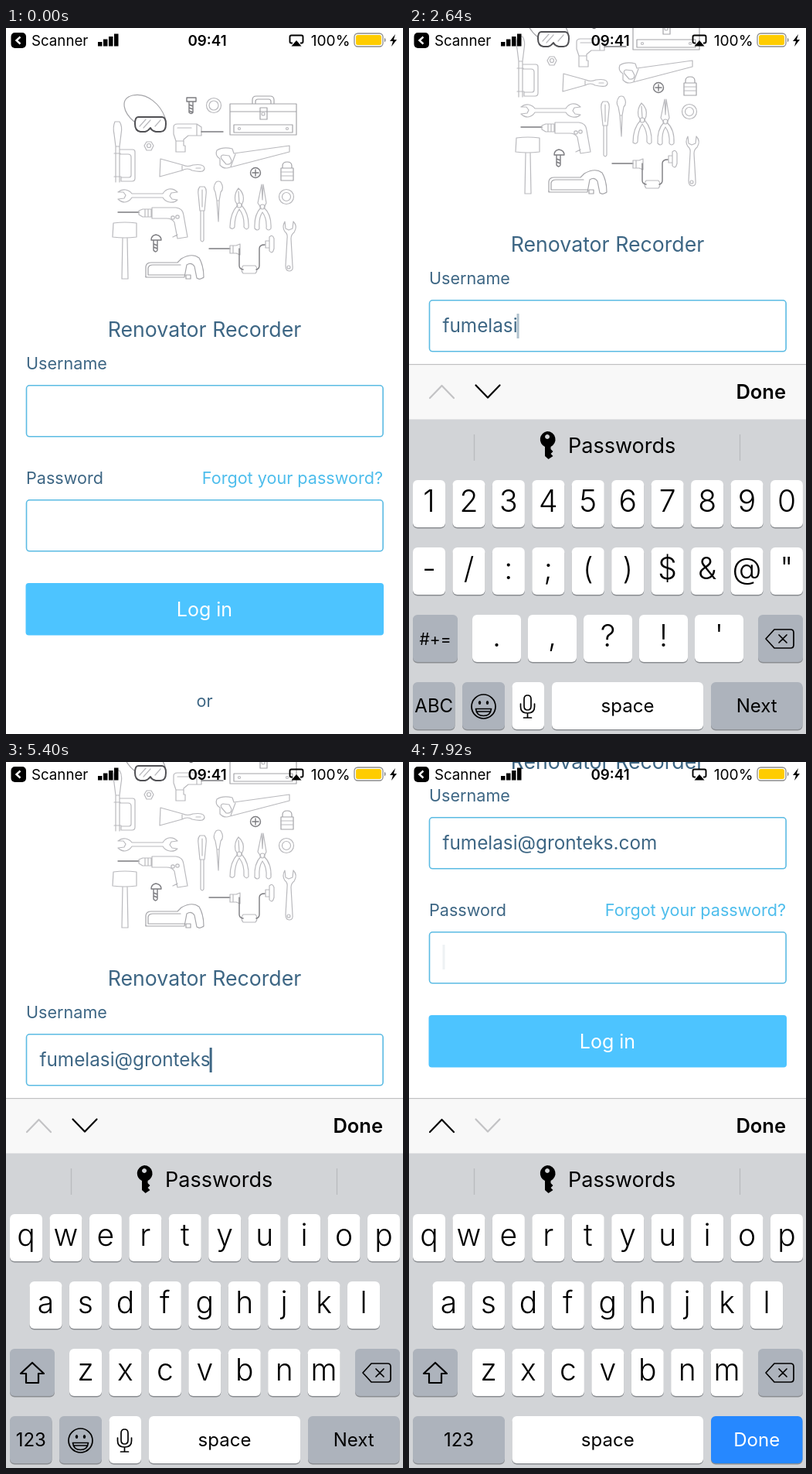
Write an HTML page that moves like this. It is 514x912 px and loops after 8 s.

```html
<!DOCTYPE html>
<html lang="en">
<head>
<meta charset="utf-8">
<title>Login</title>
<style>
html, body { margin: 0; width: 100%; height: 100%; overflow: hidden; background: #fff; }
svg { display: block; width: 514px; height: 912px; font-family: Inter, "Open Sans", sans-serif; }
.mid { text-anchor: middle; }
.end { text-anchor: end; }
.ink { fill: #3d6684; }
.link { fill: #4dbdec; }
.field { fill: #fff; stroke: #5bbbe3; stroke-width: 1.6; }
.art { fill: none; stroke: #b9b9bd; stroke-width: 1.2; stroke-linejoin: round; stroke-linecap: round; }
.art .mild { stroke: #a4a4a8; }
.art .dark { stroke: #7c7c80; stroke-width: 1.4; }
.art .bold { stroke: #505054; stroke-width: 2; }
.line { fill: none; stroke: #000; stroke-width: 2.2; stroke-linejoin: round; stroke-linecap: round; }
.thin { stroke-width: 1.7; }
.hidden { display: none; }
#popup { filter: drop-shadow(0 1px 3px rgba(0, 0, 0, .2)); }
</style>
</head>
<body>
<svg viewBox="0 0 514 912">
  <rect width="514" height="912" fill="#fff"/>
  <g id="page">
    <g class="art">
      <!-- goggles, screw, washers, toolbox -->
      <path class="mild" d="M167 122C151 109 147 91 164 87C183 83 200 99 206 116"/>
      <path class="bold" d="M171 115h31q5 0 5 9q0 10-7 10h-6q-5-1-7-5q-3 4-7 5h-6q-7-1-7-10q0-9 4-9z"/>
      <path d="M173 127l8-9M178 129l9-10M193 127l7-8"/>
      <path class="dark" d="M234 90h12v5h-12zM237 96v13q3 3 5 0v-13M237 99l5 2M237 103l5 2M237 107l5 2"/>
      <circle cx="269" cy="100" r="9.5"/><circle cx="269" cy="100" r="6"/>
      <circle cx="363" cy="218" r="9.5"/><circle cx="363" cy="218" r="5.5"/>
      <path class="mild" d="M290 98h86v40h-86zM290 108h86M319 98v-5q0-5 5-5h18q5 0 5 5v5M323 98v-3q0-3 3-3h14q3 0 3 3v3M329 103h9v15h-9zM295 125h76v10h-76z"/>
      <circle cx="333" cy="111" r="2"/><circle cx="302" cy="130" r="1.5"/><circle cx="364" cy="130" r="1.5"/>
      <!-- small drill -->
      <path d="M217 128q0-4 5-4h25l6 4v11h-17l-6 5v8h2v8h-12v-14l-3-9zM247 124v15M222 129h18M220 146h10"/>
      <path class="dark" d="M253 134h28"/>
      <!-- clamp and nut -->
      <path d="M141 121h6q4 6 2 16l-2 16h-5l-2-16q-2-9 1-16zM142 153v46M147 153v46M140 162h8M140 192h9M147 157h17q3 0 3 3v34q0 4-4 4h-14v-5h10q3 0 3-3v-23q0-4-4-4h-11z"/>
      <path d="M182 147h6l3 5l-3 6h-6l-3-6z"/><circle cx="185" cy="152" r="2.5"/>
      <!-- scraper, saw, screw head, padlock -->
      <path d="M200 169l-1 23l29-8q7-4 13 0q16 4 16-3q-1-6-15-4q-7 3-13 0zM228 178v6M246 181h6"/>
      <path d="M295 162l72-10v8l-77 20q-8 3-13-3v-8q-7-4-4-11q8-5 20-2zM281 164q-4 1-2 5l6 7q7 1 7-5l-3-6zM297 163l-6 16"/>
      <circle class="dark" cx="323" cy="187" r="6.5"/><path class="dark" d="M323 183v8M319 187h8"/>
      <path class="mild" d="M356 181h16v16h-16zM358 181v-3q0-5 6-5t6 5v3"/>
      <path d="M356 186h16M356 191h16"/>
      <!-- wrenches -->
      <path d="M145 212q5-4 10-3q5 1 8 5h40q3-5 8-6q6-1 11 4l-8 1l-2 4l3 4l7 1q-4 4-10 3q-6-1-9-6h-40q-3 5-9 6q-5 0-9-4l8-1l2-4l-3-4z"/>
      <path d="M361 250q-4 7 0 13q4 3 3 9l-2 35q0 7 5 7t4-7l-2-35q0-5 4-8q5-8-1-14l-1 9l-5 2l-4-2z"/><circle cx="366" cy="309" r="2"/>
      <!-- drivers and pliers -->
      <path d="M251 205h6q3 3 2 10l-2 21h-6l-2-21q-1-7 2-10zM252 236v38q2 4 4 0v-38M254 209v22"/>
      <path d="M272 199q3-2 6 0q5 8 0 13l-2 11h-3l-2-11q-4-6 1-13zM273 223l2 27l1-27"/>
      <path d="M301 207q-6 7-4 17l3 5q-10 10-10 29q4 3 6-1q0-14 6-23q7 9 6 23q3 5 6 1q1-18-9-29l2-5q2-10-6-17zM301 211l1 15"/><circle cx="302" cy="229" r="3"/>
      <path d="M331 202l-5 24l4 6q-9 9-8 27q4 4 6 0q-1-14 4-21q6 8 5 21q3 4 6 0q1-18-9-27l3-6l-4-24l-1 20z"/><circle cx="332" cy="231" r="3"/>
      <!-- large drill -->
      <path class="dark" d="M145 238h27"/>
      <path d="M172 236l5-2h11v10h-11l-5-3zM180 234v10M184 234v10M189 232h31q9 1 10 10l5 28l-13 2l-4-21q-3-5-10-5h-19zM216 270l6-3"/>
      <circle cx="216" cy="245" r="2.2"/><circle cx="222" cy="244" r="2.2"/>
      <!-- mallet, bolt, hacksaw, brace -->
      <path d="M139 252q15-2 30 0v18q-15 2-31 0zM151 271l-1 53h8l-1-53"/>
      <path class="dark" d="M188 274q0-6 6-7q7 1 7 7zM191 275v12q3 4 5 0v-12M191 279l5 2M191 283l5 2"/>
      <path class="mild" d="M181 322v-14q1-5 7-5h34l5-5q14-8 23-1q6 10 6 25q-5 4-9 1l-3-15q-4-6-10-2l-3 16h-48q-3 0-2-2zM184 319v-9q1-4 6-4h36M184 319h47M233 319h6v5h-6z"/>
      <path class="dark" d="M263 285h27"/>
      <path d="M290 281h8l5-2v14l-5-2h-8zM294 281v10M341 270q4-4 6 2v13q-2 8-6 3v-18zM336 275h5v9h-5zM307 307h16q4 5 0 10h-16q-4-5 0-10z"/>
      <path class="dark" d="M302 285v22q0 4 5 5M324 312q4-1 4-5v-22q0-5 7-5"/>
    </g>
    <text class="mid ink" x="257" y="399" font-size="26.7">Renovator Recorder</text>
    <g font-size="21.6">
      <text class="ink" x="26" y="441">Username</text>
      <text class="ink" x="26" y="589">Password</text>
      <text class="link end" x="488" y="589">Forgot your password?</text>
      <text class="ink mid" x="257" y="877">or</text>
    </g>
    <rect class="field" x="26.5" y="461.8" width="461.6" height="66" rx="4"/>
    <rect class="field" x="26.5" y="609.8" width="461.6" height="66" rx="4"/>
    <rect x="25.5" y="717" width="463.5" height="67.5" rx="4" fill="#4dc4ff"/>
    <text class="mid" x="257" y="759.5" font-size="25" fill="#fff">Log in</text>
    <text id="typed" class="ink" x="43.5" y="502.5" font-size="24.3"></text>
    <rect id="caret" class="ink" width="3" height="32"/>
  </g>

  <g id="keyboard">
    <rect y="434" width="514" height="72" fill="#f8f8f8"/>
    <rect y="434" width="514" height="1.2" fill="#c0c0c2"/>
    <rect y="505.5" width="514" height="408" fill="#d2d4d7"/>
    <path id="up" class="line" d="M27 478l15.5-16l15.5 16"/>
    <path id="down" class="line" d="M86.5 461.5l15.5 16l15.5-16"/>
    <text class="end" x="488" y="479" font-size="25.5" font-weight="600">Done</text>
    <path d="M84.5 525v34M428.5 525v34" stroke="#b9bbbe" stroke-width="1.3"/>
    <path fill-rule="evenodd" d="M179 521a10.5 10.5 0 0 1 4.5 20v3l3 3l-3 3l3 3l-6 4l-4.500-4v-12a10.5 10.5 0 0 1 3-20zM179 525a3 3 0 1 0 .1 0z"/>
    <text x="206" y="549" font-size="27">Passwords</text>
    <g id="keys"></g>
    <g id="popup">
      <path fill="#fff"/>
      <text class="mid" font-size="59" font-weight="300"></text>
    </g>
  </g>

  <g id="status">
    <rect x="6.5" y="6" width="19.5" height="20" rx="5"/>
    <path d="M18.5 11.5l-5 4.5l5 4.5" fill="none" stroke="#fff" stroke-width="2.4"/>
    <text x="33" y="22.5" font-size="18.7">Scanner</text>
    <path d="M119 18h5.5v5.5h-5.5zM126 14.5h5.5v9h-5.5zM133 11h5.5v12.5h-5.5zM140 7.5h5.5v16h-5.5z"/>
    <text class="mid" x="260.5" y="22.5" font-size="18.8" font-weight="600">09:41</text>
    <path d="M371 19.5h-1.5q-2 0-2-2v-6q0-2 2-2h13q2 0 2 2v6q0 2-2 2h-1.5" fill="none" stroke="#000" stroke-width="1.9"/>
    <path d="M376 16l6.5 7.5h-13z"/>
    <text class="end" x="445.5" y="22.5" font-size="19.2">100%</text>
    <rect x="451" y="7" width="37" height="17" rx="4.5" fill="#fff" stroke="#8c8c8c" stroke-width="1.3"/>
    <rect x="453" y="9" width="33" height="13" rx="2.5" fill="#ffcc00"/>
    <path d="M490 12.5q3 3 0 6z" fill="#777"/>
    <path d="M504 8l-7 9h4l-2 7l7-9h-4z"/>
  </g>
</svg>

<script>
const LOOP = 8000;
const ADDRESS = "fumelasi@gronteks.com";
// moment at which each character lands in the field
const TYPED_AT = [840, 1010, 1150, 1290, 1430, 1580, 1840, 2080, 3000,
  3740, 3920, 4090, 4270, 4440, 4640, 4870, 5100, 5820, 6360, 6560, 6780];
const SYMBOLS_SHOWN = [[2450, 3250], [5420, 5990]];
const PRESS = 120;
const OPEN = 160, NEXT = 7290, SLIDE = 426;
const KEY_STEP = 51.44, ROWS = [584, 671, 758, 845], KEY_H = 61;

const $ = id => document.getElementById(id);
const show = (node, on) => node.classList.toggle("hidden", !on);
const spots = {};

function add(parent, tag, attrs = {}, text = "") {
  const node = document.createElementNS("http://www.w3.org/2000/svg", tag);
  for (const name in attrs) node.setAttribute(name, attrs[name]);
  node.textContent = text;
  return parent.appendChild(node);
}

// draws one key and returns its label
function key(parent, x, row, w, label = "", { fill = "#fff", color = "#000", size = 24, weight = 400, dy = 38.5 } = {}) {
  const y = ROWS[row];
  add(parent, "rect", { x, y: y + 1.5, width: w, height: KEY_H, rx: 6, fill: "#8b8e92" });
  add(parent, "rect", { x, y, width: w, height: KEY_H, rx: 6, fill });
  return add(parent, "text", { class: "mid", x: x + w / 2, y: y + dy, "font-size": size, "font-weight": weight, fill: color }, label);
}

function charKeys(parent, chars, row, x0, w = 42, step = KEY_STEP) {
  [...chars].forEach((char, i) => {
    const x = x0 + i * step;
    key(parent, x, row, w, char, { size: 39, weight: 300, dy: 41 });
    spots[char] = { x, y: ROWS[row], w };
  });
}

const GRAY = { fill: "#adb3bc" };
const icon = (parent, d, style = "line") => add(parent, "path", { class: style, d });
const group = () => add($("keys"), "g");

const letters = group(), symbols = group(), common = group(), textRow = group(), passwordRow = group();

charKeys(letters, "qwertyuiop", 0, 5);
charKeys(letters, "asdfghjkl", 1, 30.5);
charKeys(letters, "zxcvbnm", 2, 82);
key(letters, 5, 2, 58, "", GRAY);
icon(letters, "M34 776l15 14h-7v12h-16v-12h-7z");

charKeys(symbols, "1234567890", 0, 5);
charKeys(symbols, "-/:;()$&@\"", 1, 5);
charKeys(symbols, ".,?!'", 2, 82, 63, 72);
key(symbols, 5, 2, 58, "#+=", { ...GRAY, size: 21 });

key(common, 452, 2, 58, "", GRAY);
icon(common, "M473 777h21q4 0 4 4v16q0 4-4 4h-21l-11-12zM479 784l10 10M489 784l-10 10", "line thin");

const modeLabel = key(textRow, 5, 3, 54.5, "123", GRAY);
key(textRow, 69, 3, 55, "", GRAY);
add(textRow, "circle", { class: "line thin", cx: 96.5, cy: 876.5, r: 15.5 });
icon(textRow, "M86.5 879.5h20q-1 9-10 9t-10-9zM88 883h17", "line thin");
for (const cx of [91.5, 101.5]) add(textRow, "ellipse", { cx, cy: 871.5, rx: 1.7, ry: 2.6 });
key(textRow, 133.5, 3, 41.5);
icon(textRow, "M149 867q0-5 4.5-5t4.500 5v9q0 5-4.500 5t-4.500-5zM144.5 873v4q0 8 9 8t9-8v-4M153.5 885v6M148.5 891h10", "line thin");
key(textRow, 185, 3, 196, "space");
key(textRow, 391, 3, 118.5, "Next", GRAY);

key(passwordRow, 5, 3, 119, "123", GRAY);
key(passwordRow, 133.5, 3, 247.5, "space");
key(passwordRow, 391, 3, 118.5, "Done", { fill: "#2688ff", color: "#fff" });

function ease(t, start) {
  const p = Math.min(1, Math.max(0, (t - start) / SLIDE));
  return 1 - (1 - p) ** 4;
}

function blink(since) {
  const phase = since % 1000;
  if (phase < 520) return 1;
  if (phase < 650) return (650 - phase) / 130 * .6;
  return phase < 850 ? 0 : (phase - 850) / 150;
}

function drawPopup(char) {
  show($("popup"), char);
  if (!char) return;
  const { x, y, w } = spots[char];
  const headW = w + 41, left = Math.min(Math.max(x - 20.5, 4), 510 - headW);
  const right = left + headW, top = y - 101, end = x + w;
  const [shape, label] = $("popup").children;
  shape.setAttribute("d", `M${left + 13} ${top}H${right - 13}q13 0 13 13V${y - 26}
    C${right} ${y - 6} ${end} ${y - 6} ${end} ${y + 14}V${y + 55}q0 6-6 6H${x + 6}q-6 0-6-6V${y + 14}
    C${x} ${y - 6} ${left} ${y - 6} ${left} ${y - 26}V${top + 13}q0-13 13-13z`);
  label.setAttribute("x", (left + right) / 2);
  label.setAttribute("y", y - 35);
  label.textContent = char;
}

function render(t) {
  const count = TYPED_AT.filter(at => at <= t).length;
  const inPassword = t >= NEXT;
  const rise = ease(t, OPEN);
  const scroll = 110 * rise + 280 * ease(t, NEXT);
  const inSymbols = SYMBOLS_SHOWN.some(([from, to]) => t >= from && t < to);

  $("page").setAttribute("transform", `translate(0 ${-scroll})`);
  $("keyboard").setAttribute("transform", `translate(0 ${480 * (1 - rise)})`);

  $("typed").textContent = ADDRESS.slice(0, count);
  const width = count && !inPassword ? $("typed").getComputedTextLength() - 1 : 0;
  const lastEvent = inPassword ? NEXT : count ? TYPED_AT[count - 1] : OPEN;
  $("caret").setAttribute("x", 43.5 + width);
  $("caret").setAttribute("y", inPassword ? 626 : 479);
  $("caret").setAttribute("opacity", t < OPEN ? 0 : blink(t - lastEvent));

  show(letters, !inSymbols);
  show(symbols, inSymbols);
  show(textRow, !inPassword);
  show(passwordRow, inPassword);
  modeLabel.textContent = inSymbols ? "ABC" : "123";
  $("up").style.stroke = inPassword ? "#000" : "#c3c3c5";
  $("down").style.stroke = inPassword ? "#c3c3c5" : "#000";

  const pressed = count < ADDRESS.length && t >= TYPED_AT[count] - PRESS;
  drawPopup(pressed ? ADDRESS[count] : "");
}

const start = performance.now();
function tick() {
  render((performance.now() - start) % LOOP);
  requestAnimationFrame(tick);
}
render(0);
requestAnimationFrame(tick);
</script>
</body>
</html>
```
